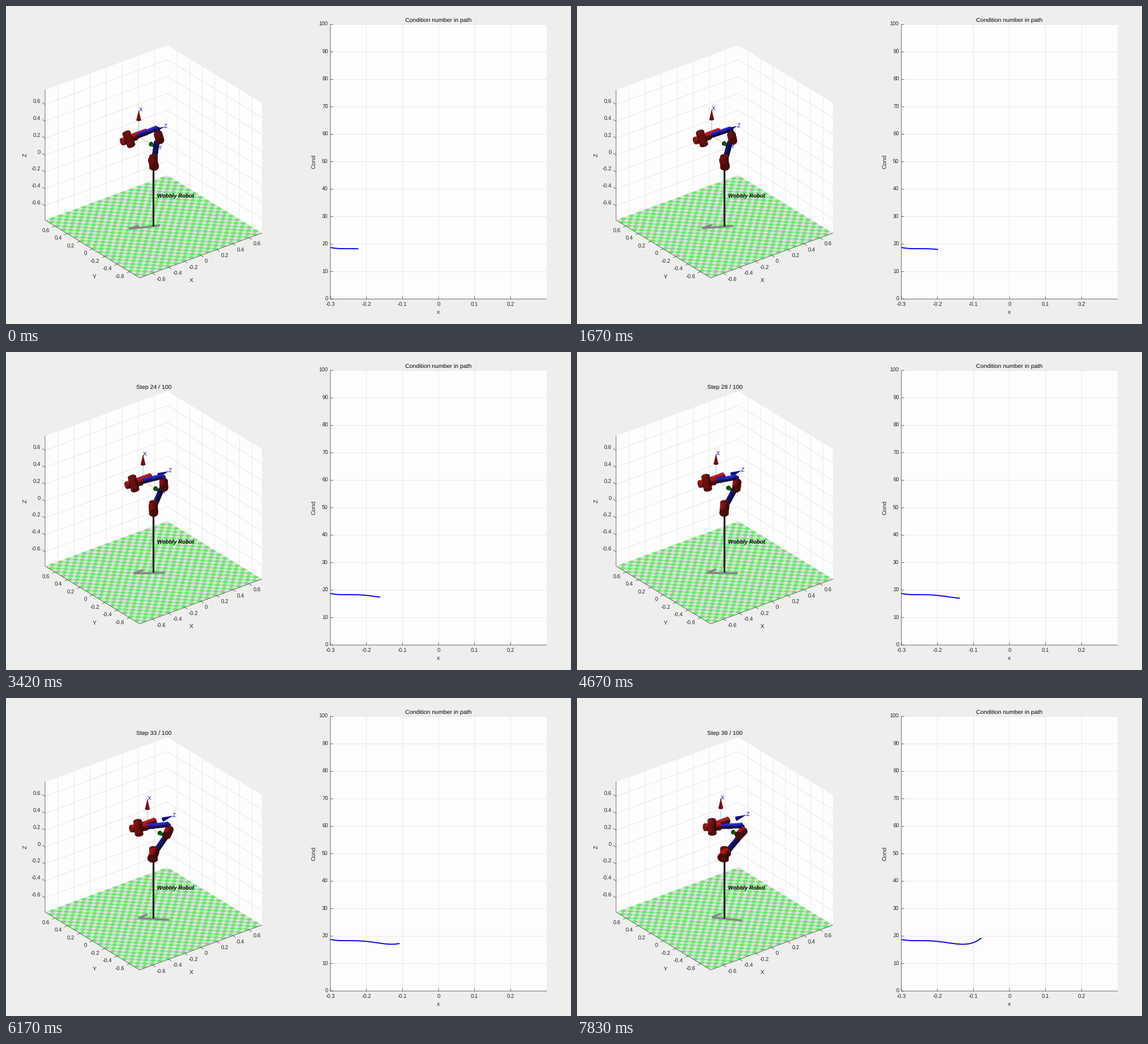
Animation, 998 px wide and 561 px high, one loop 8000 ms. Source, as a matplotlib script:

```python
import numpy as np
import matplotlib.pyplot as plt
from matplotlib.animation import FuncAnimation
from matplotlib.collections import PolyCollection

W, H, DPI = 998, 561, 100
FRAMES, INTERVAL = 160, 50
PX = 72 / DPI
TICK, LABEL = 9.6 * PX, 10.5 * PX
INK, EDGE = "#262626", "#505050"

plt.rcParams.update({"font.family": "Liberation Sans", "text.hinting": "none", "path.snap": False})
fig = plt.figure(figsize=(W / DPI, H / DPI), dpi=DPI, facecolor="#eeeeed")
ax = fig.add_axes([0, 0, 1, 1])
ax.set_xlim(0, W)
ax.set_ylim(H, 0)
ax.axis("off")


def line(pts, color, width=1.0, z=2, **kw):
    x, y = np.array(pts, float).T
    return ax.plot(x, y, color=color, lw=width * PX, zorder=z, **kw)[0]


def text(x, y, s, size=TICK, ha="center", color=INK, z=20, **kw):
    return ax.text(x, y, s, fontsize=size, ha=ha, va="center", color=color, zorder=z, **kw)


def quad(corners, color, z):
    ax.fill(*np.array(corners).T, color=color, lw=0, zorder=z)


# ---------- 3D box ----------
LIM, ZLIM, TILES = 0.76, 0.77, 31
CENTER = np.array([260.5, 274.4])
EX, EY, EZ = np.array([142.1, -52.0]), np.array([-109.9, -67.1]), np.array([0, -149.0])


def proj(x, y, z):
    return CENTER + x * EX + y * EY + z * EZ


def floor(x, y):
    return proj(x, y, -ZLIM)


def tick_name(v):
    return f"{v:.1f}" if abs(v) > 0.01 else "0"


def draw_box():
    ticks = np.arange(-3, 4) / 5
    for wall in (lambda s, z: proj(s, LIM, z), lambda s, z: proj(LIM, s, z)):
        quad([wall(-LIM, -ZLIM), wall(LIM, -ZLIM), wall(LIM, ZLIM), wall(-LIM, ZLIM)], "#fdfdfd", 1)
        for v in ticks:
            line([wall(v, -ZLIM), wall(v, ZLIM)], "#e6e6e6", 0.8)
            line([wall(-LIM, v), wall(LIM, v)], "#e2e2e4", 0.8)

    left, front, right = floor(-LIM, LIM), floor(-LIM, -LIM), floor(LIM, -LIM)
    quad([left, front, right, floor(LIM, LIM)], "#dedede", 2.5)
    e = np.linspace(-LIM, LIM, TILES + 1)
    cells = [[floor(e[i], e[j]), floor(e[i + 1], e[j]), floor(e[i + 1], e[j + 1]), floor(e[i], e[j + 1])]
             for i in range(TILES) for j in range(TILES) if (i + j) % 2]
    ax.add_collection(PolyCollection(cells, facecolors="#69e86b", linewidths=0, zorder=2.6))

    line([proj(-LIM, LIM, ZLIM), left, front, right], EDGE, 0.8, 3)
    for v in ticks:
        p, q, r = floor(v, -LIM), floor(-LIM, v), proj(-LIM, LIM, v)
        for start, out in ((p, (4.5, 2.8)), (q, (-4.8, 1.8)), (r, (-4.5, -2.8))):
            line([start, start + out], EDGE, 0.8, 3)
        text(p[0] + 7, p[1] + 11.5, tick_name(v), ha="left")
        text(q[0] - 9.5, q[1] + 9, tick_name(v), ha="right")
        text(60.8, r[1] - 4, tick_name(v), ha="right")
    text(327, 484, "X", LABEL)
    text(156.5, 478, "Y", LABEL)
    text(34, 262.5, "Z", LABEL, rotation=90)
    text(267, 335, "Wobbly Robot", ha="left", color="black", weight="bold", style="italic")


# ---------- right-hand plot ----------
X0, X1, Y0, Y1 = 573, 955, 517, 32.5


def plot_xy(x, cond):
    return X0 + (X1 - X0) * (x + 0.3) / 0.6, Y0 + (Y1 - Y0) * cond / 100


def draw_plot():
    quad([(X0, Y0), (X1, Y0), (X1, Y1), (X0, Y1)], "#fdfdfd", 1)
    for cond in range(0, 101, 10):
        y = plot_xy(0, cond)[1]
        line([(X0, y), (X1, y)], "#e3e3e6", 0.8)
        line([(X0, y), (X0 + 4.5, y)], EDGE, 0.8, 3)
        text(568.8, y + 0.3, str(cond), ha="right")
    for v in np.arange(-3, 3) / 10:
        x = plot_xy(v, 0)[0]
        line([(x, Y0), (x, Y1)], "#e3e3e6", 0.8)
        line([(x, Y0), (x, Y0 - 4.5)], EDGE, 0.8, 3)
        text(x, 527, tick_name(v))
    line([(X0, Y1), (X0, Y0), (X1, Y0)], EDGE, 0.8, 3)
    text(764, 25.5, "Condition number in path", LABEL, color="black")
    text(764, 540, "x", LABEL)
    text(544, 274.5, "Cond", LABEL, rotation=90)


# condition number along the path, a smooth fit through a few points
COND = np.polynomial.Polynomial.fit([-0.3, -0.25, -0.21, -0.162, -0.127, -0.107, -0.077],
                                    [18.8, 18.35, 18.18, 17.45, 17.0, 17.42, 19.45], 5)

# ---------- robot ----------
RED, BLUE, NAVY = (205, 30, 27), (45, 45, 255), (18, 18, 165)
LIGHT = np.array([-0.4, -0.9])
HIP = np.array([260.4, 277])


def ring(c, u, n, r, e):
    a = np.linspace(0, 2 * np.pi, 20, endpoint=False)[:, None]
    return c + n * r * np.cos(a) + u * e * np.sin(a)


def unit(v):
    u = v / np.hypot(*v)
    return u, np.array([-u[1], u[0]])


def tube(polys, p0, p1, r, e, base, cap=0.6):
    """Shaded cylinder whose visible cap is at p0."""
    base = np.array(base) / 255
    u, n = unit(p1 - p0)
    a = np.linspace(0, np.pi, 10)
    off = n * r * np.cos(a)[:, None] + u * e * np.sin(a)[:, None]
    for i in range(len(a) - 1):
        m = (a[i] + a[i + 1]) / 2
        glow = 0.27 + 0.9 * max(0, 0.25 * np.sin(m) + 0.75 * np.cos(m) * (n @ LIGHT))
        polys.append(([p0 + off[i], p1 + off[i], p1 + off[i + 1], p0 + off[i + 1]],
                      base * min(glow, 1)))
    polys.append((ring(p0, u, n, r, e), base * cap))


def cone(polys, base, tip, r, e, color):
    u, n = unit(tip - base)
    color = np.array(color) / 255
    polys.append((ring(base, u, n, r, e), color * 0.75))
    polys.append(([base + n * r, tip, base - n * r], color))
    polys.append(([base + n * r * 0.5, tip, base - n * r * 0.1], np.clip(color * 1.35, 0, 1)))


def show(coll, polys):
    coll.set_verts([p for p, _ in polys])
    colors = [tuple(c) for _, c in polys]
    coll.set_facecolor(colors)
    coll.set_edgecolor(colors)


def polar(deg):
    """Screen direction at an angle above the horizontal."""
    return np.array([np.cos(np.radians(deg)), -np.sin(np.radians(deg))])


def mix(a, b, q):
    return np.array(a) * (1 - q) + np.array(b) * q


draw_box()
draw_plot()
shadow = line([(0, 0)], "#858585", 3.6, 4, solid_joinstyle="miter")
line([(260.5, 286), (260.5, 389)], "black", 3, 4.5, solid_capstyle="butt")
x_line = line([(0, 0)], "#93cbe8", 1, 4.8)
y_line = line([(0, 0)], "#e3b48c", 1, 4.8)
cones = ax.add_collection(PolyCollection([], linewidths=0.2, zorder=5))
arm = ax.add_collection(PolyCollection([], linewidths=0.3, zorder=7))
names = [text(0, 0, s, color="#0000e6", z=z) for s, z in (("X", 9), ("Y", 6), ("Z", 9))]
title = text(261, 62.5, "", LABEL, color="black")
curve = line([(0, 0)], "#0000ee", 1.9, 8, solid_capstyle="butt")

DIRS = np.array([[0, -46.5], [34, 20.5], [44, -17]])
CONES = [(4, 1.7, (105, 12, 12)), (4, 3, (0, 84, 0)), (3.6, 1.7, (0, 0, 120))]


def draw_frame_axes(origin):
    polys = []
    for d, name, (r, e, color) in zip(DIRS, names, CONES):
        cone(polys, origin + 0.63 * d, origin + d, r, e, color)
        name.set_position(origin + d + (3.3, -1))
    show(cones, polys)
    for ln, d in ((x_line, DIRS[0]), (y_line, DIRS[1])):
        ln.set_data(*np.array([origin, origin + 0.63 * d]).T)


def draw_robot(origin, q):
    tilt = mix(21.5, 2.5, q)
    along, across = polar(tilt), polar(tilt - 90)
    axis = polar(16 - 61 * q ** 1.7 - 90)
    wrist = origin + mix((-17.5, 4.5), (-15.5, 3.8), q)
    top = wrist + 53 * along
    elbow = top + mix((4, 16), (-1.5, 13.5), q)
    grip = wrist + 14 * along

    polys = []
    tube(polys, wrist + (9, -5), origin + (13.5, -8.5), 5.6, 2.5, RED)
    tube(polys, top, elbow, 4.4, 2, NAVY)
    tube(polys, elbow + (-4, 8), mix((262.5, 266), (265.5, 271), q), 4.7, 2, NAVY)
    tube(polys, elbow + 6 * axis, elbow - 6 * axis, 7.4, 6.2, RED, 0.36)
    tube(polys, HIP - (0, 12), HIP + (0, 9), 7.3, 3.6, RED, 0.5)
    tube(polys, HIP + 7 * axis, HIP - 6 * axis, 7.8, 6.6, RED, 0.36)
    tube(polys, top, grip, 4.4, 1.6, BLUE, 0.55)
    tube(polys, wrist - 13 * along, grip, 6.5, 3.2, RED, 0.62)
    tube(polys, wrist + 12 * across, wrist - 12 * across, 7.2, 3.4, RED, 0.38)
    show(arm, polys)
    shadow.set_data(*np.array([origin + (-1.5, 157.5), (wrist[0], 393 - 6 * q),
                               (elbow[0], 387.3 + 5 * q)]).T)


# One path step takes 319 ms: the arm moves first, curve and title catch up.
FIRST, STEP_MS, LAG = 15, 319, 100


def step_at(t, least):
    return max(least, int(22 + (t - 2583) / STEP_MS))


def update(i):
    t = (i + 1) * INTERVAL
    step, done = step_at(t, FIRST), step_at(t - LAG, FIRST - 1)
    q = (step - FIRST) / 23
    origin = np.array([234.5, 230.5]) + q * np.array([19.5, -7])
    draw_frame_axes(origin)
    draw_robot(origin, q)
    x = np.linspace(-0.3, -0.306 + 0.006 * done, 80)
    curve.set_data(*plot_xy(x, COND(x)))
    title.set_text(f"Step {done} / 100" if done == step else "")
    return cones, arm, shadow, curve, title


anim = FuncAnimation(fig, update, frames=FRAMES, interval=INTERVAL, repeat=True, repeat_delay=0)
plt.show()
```
